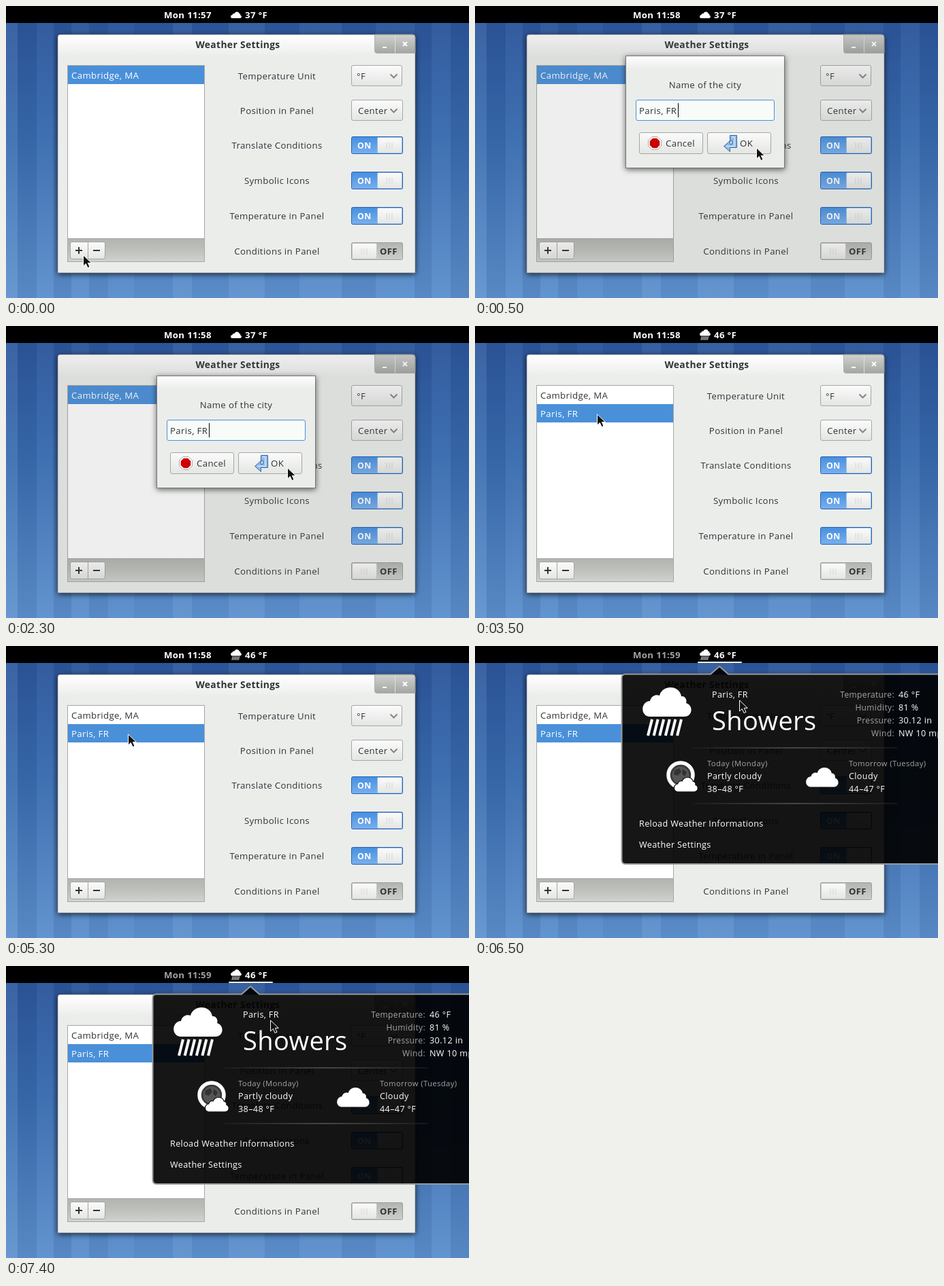
An HTML page for the animation above (8000 ms loop, 680 by 430 pixels).

```html
<!DOCTYPE html>
<html lang="en">
<head>
<meta charset="utf-8">
<title>Weather settings</title>
<style>
  html, body { margin: 0; width: 100%; height: 100%; overflow: hidden; background: #000; }
  svg { display: block; width: 680px; height: 430px; }
  text { font: 13.2px "Open Sans", "Noto Sans", sans-serif; letter-spacing: .37px; fill: #2e3436; white-space: pre; }
  .bold { font-weight: 700; }
  .mid { text-anchor: middle; }
  .end { text-anchor: end; }
  .white { fill: #fff; }
  .grey { fill: #a3a3a3; }
  .menu { font-size: 12.6px; }
</style>
</head>
<body>
<svg id="stage" viewBox="0 0 680 430"></svg>
<script>
const stage = document.getElementById('stage');
const STARTS = [0, 500, 3500, 6500], LOOP = 8000;

const at = (scenes, body) => `<g data-at="${scenes}">${body}</g>`;
const move = (x, y, body, scale = 1) => `<g transform="translate(${x} ${y}) scale(${scale})">${body}</g>`;
const text = (x, y, str, cls = '', size = '') =>
  `<text x="${x}" y="${y}" class="${cls}"${size && ` style="font-size:${size}px"`}>${str}</text>`;
const box = (x, y, w, h, fill, extra = '') =>
  `<rect x="${x}" y="${y}" width="${w}" height="${h}" fill="${fill}" ${extra}/>`;
const line = (d, color, width = 1, extra = '') =>
  `<path d="${d}" fill="none" stroke="${color}" stroke-width="${width}" ${extra}/>`;
const gradient = (id, dir, ...stops) =>
  `<linearGradient id="${id}" x2="${dir === 'h' ? 1 : 0}" y2="${dir === 'h' ? 0 : 1}">` +
  stops.map(([pos, color]) => `<stop offset="${pos}" stop-color="${color}"/>`).join('') + '</linearGradient>';
const shadow = (id, blur, opacity) =>
  `<filter id="${id}" x="-10%" y="-10%" width="120%" height="120%">
   <feDropShadow dx="0" dy="2" stdDeviation="${blur}" flood-opacity="${opacity}"/></filter>`;

const button = (x, y, w, h) => box(x + .5, y + .5, w, h, 'url(#button)', 'rx="2.5" stroke="#a5a7a3"');
const cloud = '<path fill="#fff" d="M12 43C-4 43-3 21 11 20C13 12 20 10 25 12C29-4 54-4 57 13C62 12 66 18 64 23C75 26 74 43 61 43Z"/>';
const rain = [0, 1, 2, 3, 4, 5].map(i =>
  line(`M${14 + i * 8.6} 47L${8 + i * 8.6} 71`, '#fff', 4)).join('');
const pointer = (x, y) => move(x, y,
  '<path d="M.5 0V16L4.3 12.5L7 18.6L10 17.3L7.3 11.4H12.3Z" fill="#111" stroke="#fff"/>');

const defs = '<defs>' +
  gradient('sky', 'v', [0, '#2a5499'], [.45, '#396bae'], [1, '#5d90cd']) +
  gradient('title', 'v', [0, '#fff'], [1, '#ebedeb']) +
  gradient('corner', 'v', [0, '#d0d2cf'], [1, '#a4a6a2']) +
  gradient('bar', 'v', [0, '#b2b4af'], [.4, '#bbbdb8'], [1, '#d0d2cd']) +
  gradient('button', 'v', [0, '#fbfbfb'], [1, '#e4e6e3']) +
  gradient('on', 'v', [0, '#468fe0'], [1, '#79b0ee']) +
  gradient('off', 'v', [0, '#b3b5b1'], [1, '#cccec9']) +
  gradient('rule', 'h', [0, '#222'], [.5, '#777'], [1, '#222']) +
  shadow('winShadow', 4.5, .75) + shadow('dialogShadow', 4, .6) + '</defs>';

function wallpaper() {
  // x, width, lightness of each band
  const bands = [[0, 17, .07], [17, 28, -.05], [45, 25, .03], [70, 26, -.06], [96, 26, .03], [122, 28, -.05],
    [150, 38, .02], [188, 57, -.03], [245, 28, .05], [273, 54, -.03], [327, 53, .05], [380, 51, -.03],
    [431, 62, .04], [493, 50, -.04], [543, 57, .03], [600, 25, -.05], [625, 28, .03], [653, 27, -.06]];
  return box(0, 0, 680, 430, 'url(#sky)') + bands.map(([x, w, a]) =>
    box(x, 25, w, 405, a > 0 ? '#fff' : '#002', `opacity="${Math.abs(a)}"`)).join('');
}

function panel() {
  const clock = (scenes, time, fill = '') => at(scenes, text(232, 18, 'Mon ' + time, 'bold ' + fill));
  return box(0, 0, 680, 25, '#000') + '<g style="--c:#ddd">' +
    clock('0', '11:57', 'white') + clock('12', '11:58', 'white') + clock('3', '11:59', 'grey') + '</g>' +
    at('01', move(330, 8.5, cloud, .222) + text(351, 18, '37 °F', 'bold white')) +
    at('23', move(330, 5, cloud + rain, .222) + text(351, 18, '46 °F', 'bold white')) +
    at('3', box(327, 23, 65, 2, '#eee', 'rx="1"'));
}

function combo(y, w, label) {
  return button(507, y, w, 30) + text(label.length > 2 ? 517 : 515, y + 21, label) +
    line(`M564.5 ${y + 13.5}L569.5 ${y + 18.5}L574.5 ${y + 13.5}`, '#858784', 2);
}

function toggle(y, on) {
  const knob = on ? 545.5 : 508.5;
  const grip = [0, 4, 8].map(i => `M${knob + 13.5 + i} ${y + 9}v9`).join('');
  return box(507.5, y + .5, 75, 25, `url(#${on ? 'on' : 'off'})`, `rx="2" stroke="${on ? '#2362b0' : '#9a9c98'}"`) +
    box(knob, y + 1.5, 36, 23, 'url(#button)', `rx="1.5" stroke="${on ? '#9bbfe8' : '#c6c8c4'}"`) +
    line(grip, '#d5d7d4') +
    (on ? text(516, y + 18, 'ON', 'bold white', 12.3) : text(549, y + 18, 'OFF', 'bold', 13));
}

function cityList() {
  const row = (y, name, selected) => (selected ? box(91, y, 200, 27, '#4a90d9') : '') +
    text(96, y + 19, name, selected ? 'white' : '');
  return box(90.5, 87.5, 201, 289, '#fff', 'stroke="#a5a7a3"') +
    box(91, 342, 200, 34, 'url(#bar)') + line('M91 342.5H291', '#a5a7a3') +
    at('01', row(88, 'Cambridge, MA', true)) +
    at('23', row(88, 'Cambridge, MA') + row(115, 'Paris, FR', true)) +
    button(94, 347, 51, 25) + line('M120.5 348V372', '#a5a7a3') +
    line('M102 360H112M107 355V365M128 360H138', '#2e3436', 2);
}

function settings() {
  const labels = ['Temperature Unit', 'Position in Panel', 'Translate Conditions',
    'Symbolic Icons', 'Temperature in Panel', 'Conditions in Panel'];
  const frame = 'M76 393V46Q76 42 80 42H597Q601 42 601 46V393Z';
  return `<path d="${frame}" fill="#ebedeb" filter="url(#winShadow)"/>` +
    '<path d="M76 74V46Q76 42 80 42H597Q601 42 601 46V74Z" fill="url(#title)"/>' +
    '<path d="M541.5 42V66Q541.5 69.5 545 69.5H601V46Q601 42 597 42Z" fill="url(#corner)" stroke="#b0b2ae"/>' +
    line('M571.5 43V69', '#dcdedb') + line('M553 61H559M583 53L589 59M589 53L583 59', '#fff', 2) +
    text(340.5, 62, 'Weather Settings', 'bold mid', 13.8) + cityList() +
    labels.map((label, i) => text(398, [108, 159, 210, 262, 314, 366][i], label, 'mid')).join('') +
    combo(87, 74, '°F') + combo(138, 75, 'Center') +
    [192, 244, 296, 348].map((y, i) => toggle(y, i < 3)).join('') +
    at('1', `<path d="${frame}" fill="#5a5a5a" opacity=".1"/>`) +
    line(frame, '#777', .6);
}

function dialog() {
  const stop = '<path d="M-4-9.5H4L9.5-4V4L4 9.5H-4L-9.5 4V-4Z" fill="#fff" stroke="#aaa"/>' +
    '<path d="M-3-7.3H3L7.3-3V3L3 7.3H-3L-7.3 3V-3Z" fill="#cc0000"/>';
  const enter = '<path d="M0 9L9 1V6H12V1H9V-7H19V11H9V17Z" transform="translate(.5 .5)" fill="#8fbbe8" stroke="#3465a4" stroke-linejoin="round"/>' +
    line('M4 9.5H16V-4H12', '#d3e5f7', 1.5);
  return box(221.5, 73.5, 233, 165, '#ebedeb', 'stroke="#777" filter="url(#dialogShadow)"') +
    box(222, 74, 232, 18, 'url(#title)') +
    text(338, 121, 'Name of the city', 'mid') +
    box(236.5, 138.5, 203, 30, '#f8fcf9', 'rx="2.5" stroke="#4a90d9"') +
    text(241, 159, 'Paris, FR') + box(298, 143, 1, 21, '#000') +
    button(241, 186, 93, 31) + button(341, 186, 93, 31) +
    move(264, 202, stop) + text(280, 207, 'Cancel') +
    move(365, 197, enter) + text(389, 207, 'OK');
}

function forecast() {
  const facts = [['Temperature:', '46 °F'], ['Humidity:', '81 %'], ['Pressure:', '30.12 in'], ['Wind:', 'NW 10 mph']];
  const day = (x, name, sky, range) => text(x, 177, name, 'grey', 11.3) +
    text(x, 196, sky, 'menu white') + text(x, 215, range, 'menu white');
  const moon = '<circle cx="302" cy="190" r="18" fill="#3a3a3a" stroke="#fff" stroke-width="5.5"/>' +
    '<circle cx="302" cy="190" r="12.5" fill="#555"/><path d="M293 183l7-3 3 5-5 6-6-2zM305 181l6 5-3 6-4-4z" fill="#333"/>';
  const smallCloud = cloud.replace('/>', ' stroke="#111" stroke-width="5" paint-order="stroke"/>');
  return '<path d="M690 41.5H372L359 30L346 41.5H221Q215.5 41.5 215.5 47V315Q215.5 321 221 321H690Z" fill="#000" fill-opacity=".915" stroke="#999" stroke-width="2"/>' +
    move(246, 61, cloud + rain) +
    text(348, 76, 'Paris, FR', 'menu white') + text(348, 123.5, 'Showers', 'white', 38) +
    facts.map(([name, value], i) => text(616, 76 + i * 19, name, 'end grey', 12) +
      text(622, 76 + i * 19, value, 'menu white')).join('') +
    box(320, 149.5, 300, 1, 'url(#rule)') + box(320, 231.5, 300, 1, 'url(#rule)') +
    moon + move(293, 194, smallCloud, .47) + move(486, 179, cloud, .665) +
    day(341, 'Today (Monday)', 'Partly cloudy', '38–48 °F') +
    day(549, 'Tomorrow (Tuesday)', 'Cloudy', '44–47 °F') +
    text(241, 266, 'Reload Weather Informations', 'menu white') +
    text(241, 297, 'Weather Settings', 'menu white');
}

stage.innerHTML = defs + wallpaper() + panel() + settings() + at('1', dialog()) + at('3', forecast()) +
  [[113, 367], [413, 209], [179, 130], [388, 80]].map(([x, y], i) => at(i, pointer(x, y))).join('');

const parts = [...stage.querySelectorAll('[data-at]')];
function draw(now) {
  const time = now % LOOP;
  const scene = STARTS.filter(start => start <= time).length - 1;
  for (const part of parts) part.style.display = part.dataset.at.includes(scene) ? '' : 'none';
  requestAnimationFrame(draw);
}
draw(performance.now());
</script>
</body>
</html>
```
